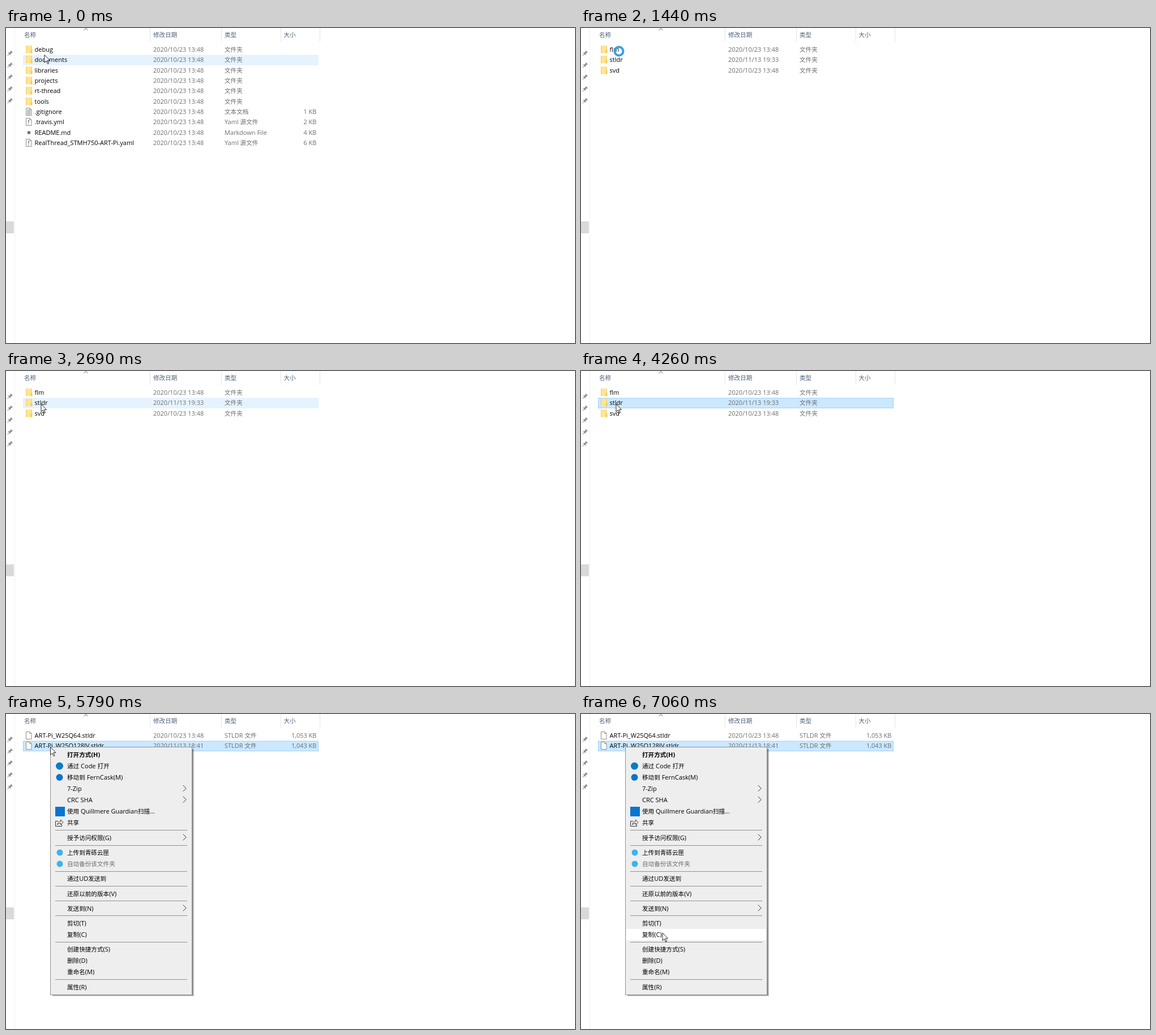
Recreate the animation shown at these times as an HTML page. Size 1005 px wide and 557 px high, loop 8 s.

```html
<!DOCTYPE html>
<html lang="zh-CN">
<head>
<meta charset="utf-8">
<title>File list</title>
<style>
html, body { margin: 0; width: 100%; height: 100%; overflow: hidden; background: #fff; }
svg { display: block; width: 1005px; height: 557px; }
text { font: 11px "Open Sans", "Noto Sans", sans-serif; white-space: pre; }
.cjk { font-family: "Noto Sans CJK SC", "Noto Sans CJK", sans-serif; font-size: 10.6px; }
.bold { font-weight: 700; }
.end { text-anchor: end; }
</style>
</head>
<body>
<svg id="stage" viewBox="0 0 1005 557"></svg>
<script>
const LOOP = 8000;
const ROW_TOP = 29.2, ROW_STEP = 18.33;
const INK = '#000', META = '#6d6d6d', HEAD = '#4c607a';
const stage = document.getElementById('stage');

// ---- drawing helpers ----
const label = (x, y, s, fill = INK, cls = '') =>
  `<text x="${x}" y="${y}" fill="${fill}" class="${cls}">` +
  s.replace(/[\u2e80-\u9fff]+/g, '<tspan class="cjk">$&</tspan>') + '</text>';
const rect = (x, y, w, h, fill, more = '') =>
  `<rect x="${x}" y="${y}" width="${w}" height="${h}" fill="${fill}" ${more}/>`;
const path = (d, fill, stroke = 'none', more = '') =>
  `<path d="${d}" fill="${fill}" stroke="${stroke}" ${more}/>`;
const dot = (x, y, r, fill) => `<circle cx="${x}" cy="${y}" r="${r}" fill="${fill}"/>`;
const at = (x, y, body, more = '') => `<g transform="translate(${x} ${y})${more}">${body}</g>`;

const page = path('M.5-6.5h6.5l3 3v10h-9.5z', '#fff', '#8c8c8c') + path('M7-6.5v3h3', 'none', '#8c8c8c');
const icons = {
  folder: rect(0, -7, 10.5, 13.5, '#ffe494') + rect(0, -7, 1, 13.5, '#f3cf6b') +
    path('M8.5 6.5V1h1V-7h1V0h1v6.5z', '#f2cb60'),
  text: page + path('M2-3.5h4.5M2-1.5h6.5M2 .5h6.5M2 2.5h6.5M2 4.5h6.5', 'none', '#7d7d7d', 'stroke-width=".9"'),
  yaml: page + path('M5-3.5v5M5 3v1.5', 'none', '#555', 'stroke-width="1.2"'),
  mark: rect(3, -2.5, 5, 5, '#707070'),
  page
};

// ---- folder contents: icon, name, type, size, date ----
const DAY = '2020/10/23 13:48';
const dir = (name, date = DAY) => ['folder', name, '文件夹', '', date];
const views = [
  [
    ...['debug', 'documents', 'libraries', 'projects', 'rt-thread', 'tools'].map(n => dir(n)),
    ['text', '.gitignore', '文本文档', '1 KB', DAY],
    ['yaml', '.travis.yml', 'Yaml 源文件', '2 KB', DAY],
    ['mark', 'README.md', 'Markdown File', '4 KB', DAY],
    ['yaml', 'RealThread_STMH750-ART-Pi.yaml', 'Yaml 源文件', '6 KB', DAY]
  ],
  [dir('flm'), dir('stldr', '2020/11/13 19:33'), dir('svd')],
  [
    ['page', 'ART-Pi_W25Q64.stldr', 'STLDR 文件', '1,053 KB', DAY],
    ['page', 'ART-Pi_W25Q128JV.stldr', 'STLDR 文件', '1,043 KB', '2020/11/13 18:41']
  ]
];
const fileRow = ([icon, name, type, size, date], i) => {
  const mid = 38 + i * ROW_STEP, y = mid + 4;
  return at(35, Math.round(mid), icons[icon]) + label(50.5, y, name) + label(260, y, date, META) +
    label(386, y, type, META) + label(548.5, y, size, META, 'end');
};

const pin = path('M-2.5-5h5v1h-1v3.5l2 2h-7l2-2v-3.5h-1zM-.5 1.5h1v4.5h-1z', '#848e99');
const frame =
  rect(15, 0, 1, 557, '#f0f0f0') + rect(0, 342, 14, 21, '#d9d9d9') +
  [45, 66, 87, 108, 129].map(y => at(6.8, y, pin, ' rotate(45)')).join('') +
  [254, 380, 485, 554].map(x => rect(x, 0, 1, 24, '#e5e5e5')).join('') +
  path('M137.5 4 141 .7 144.5 4', 'none', '#666') +
  [[32, '名称'], [260, '修改日期'], [386, '类型'], [490.5, '大小']].map(([x, s]) => label(x, 16, s, HEAD)).join('');

// ---- context menu: centre line, caption, submenu arrow ----
const items = [
  [72, '打开方式(H)'], [92, '通过 Code 打开'], [112, '移动到 FernCask(M)'],
  [132, '7-Zip', 1], [152, 'CRC SHA', 1], [172, '使用 Quillmere Guardian扫描...'], [192, '共享'],
  [218.5, '授予访问权限(G)', 1], [245, '上传到青砾云匣'], [265, '自动备份该文件夹'],
  [291, '通过UD发送到'], [317.5, '还原以前的版本(V)'], [343.5, '发送到(N)', 1],
  [370, '剪切(T)'], [390, '复制(C)'], [416, '创建快捷方式(S)'], [436, '删除(D)'],
  [456, '重命名(M)'], [482.5, '属性(R)']
];
const menuItem = ([y, s, more], i) =>
  label(108, y + 4, s, i === 9 ? '#6d6d6d' : INK, i ? '' : 'bold') +
  (more ? path(`M312.800 ${y - 6}l5.400 5.400l-5.400 5.400`, 'none', '#26324a') : '');
const share = path('M92 189.5h-4.5v9h11v-3M90.5 196c.5-4 3-6 6-6v-3l4.5 4.5l-4.5 4.5v-3c-2.5 0-4.5 1-6 3z', 'none', '#333');
const shadow = [2, 1, 0].map(d => rect(82, 62, 248 + d, 435 + d, '#000', 'opacity=".2"')).join('');
const menu =
  shadow + '<g id="panel">' + rect(78.5, 58.5, 250, 438, '#eee', 'stroke="#939393"') +
  '<g id="lit">' + rect(80, -10, 247, 20, '#fff') + '</g>' +
  [205, 232, 278, 304, 330, 356, 403, 469].map(y => rect(87, y, 233, 1, '#919191')).join('') +
  dot(94.5, 92, 6.5, '#0a7bc8') + dot(94.5, 112, 6, '#1173c9') + rect(87, 164, 17, 17, '#0a74d1') +
  share + dot(95, 245, 5.5, '#3fb2ee') + dot(95, 265, 5.5, '#3fb2ee') +
  items.map(menuItem).join('') + '</g>';

const arrow = path('M.5.5v13.7l3.2-3 2.4 5.3 2-.9-2.4-5.2h4.3z', '#fff', '#111', 'stroke-width=".9"');
const ring = '<circle r="7.5" fill="none" stroke="#3c9ee2" stroke-width="4"/>';

stage.innerHTML = rect(0, 0, 1005, 557, '#fff') + '<g id="row"></g>' + frame +
  views.map((v, i) => `<g id="view${i}">${v.map(fileRow).join('')}</g>`).join('') +
  `<g id="menu">${menu}</g><g id="cursor"><g id="arrow">${arrow}</g><g id="ring">${ring}</g></g>`;
const el = id => document.getElementById(id);
el('row').innerHTML = '<rect/>';
const bar = el('row').firstChild;

// ---- timeline: every step changes only the listed fields ----
const steps = [
  { t: 0, view: 0, row: 1, picked: 0, x: 67.5, y: 47, busy: 0, fade: 0, lit: -1 },
  { t: 160, row: 0, x: 67, y: 43.5 },
  { t: 310, y: 41 },
  { t: 1000, picked: 1 },
  { t: 1290, busy: 1 },
  { t: 1440, view: 1, row: -1, picked: 0 },
  { t: 1570, row: 0, busy: 0 },
  { t: 1830, x: 65.5, y: 43 },
  { t: 1970, row: 1, x: 64, y: 63.5 },
  { t: 2120, row: 2, x: 63, y: 69 },
  { t: 2250, x: 62.5, y: 70 },
  { t: 2410, x: 61.5, y: 68 },
  { t: 2550, row: 1, y: 59.5 },
  { t: 2690, y: 58 },
  { t: 4260, picked: 1 },
  { t: 4530, view: 2, row: -1, picked: 0 },
  { t: 4660, row: 1 },
  { t: 4920, x: 68 },
  { t: 5080, x: 78 },
  { t: 5490, picked: 1 },
  { t: 5640, fade: 0.6 },
  { t: 5790, fade: 1 },
  { t: 6350, x: 79 },
  { t: 6630, x: 112, y: 215, lit: 4 },
  { t: 6770, x: 130, y: 305, lit: -1 },
  { t: 6900, x: 141, y: 364 },
  { t: 7060, x: 143.5, y: 386.5, lit: 14 }
];
const states = [];
steps.forEach((s, i) => states.push({ ...states[i - 1], ...s }));

const show = (node, on) => { node.style.display = on ? '' : 'none'; };

function draw(s) {
  views.forEach((_, i) => show(el('view' + i), i === s.view));
  show(bar, s.row >= 0);
  const inset = s.picked ? 0.5 : 0;
  bar.setAttribute('x', 30 + inset);
  bar.setAttribute('y', ROW_TOP + s.row * ROW_STEP + inset);
  bar.setAttribute('width', 522 - 2 * inset);
  bar.setAttribute('height', ROW_STEP - 2 * inset);
  bar.setAttribute('fill', s.picked ? '#cce8ff' : '#e5f3ff');
  bar.setAttribute('stroke', s.picked ? '#99d1ff' : 'none');
  show(el('menu'), s.fade > 0);
  el('panel').style.opacity = s.fade;
  show(el('lit'), s.lit >= 0);
  if (s.lit >= 0) el('lit').setAttribute('transform', `translate(0 ${items[s.lit][0]})`);
  el('cursor').setAttribute('transform', `translate(${s.x} ${s.y})`);
  show(el('arrow'), !s.busy);
  show(el('ring'), s.busy);
}

const start = performance.now();
let current;
function tick() {
  const time = (performance.now() - start) % LOOP;
  const next = states.findLast(s => s.t <= time) || states[0];
  if (next !== current) draw(current = next);
  requestAnimationFrame(tick);
}
tick();
</script>
</body>
</html>
```
